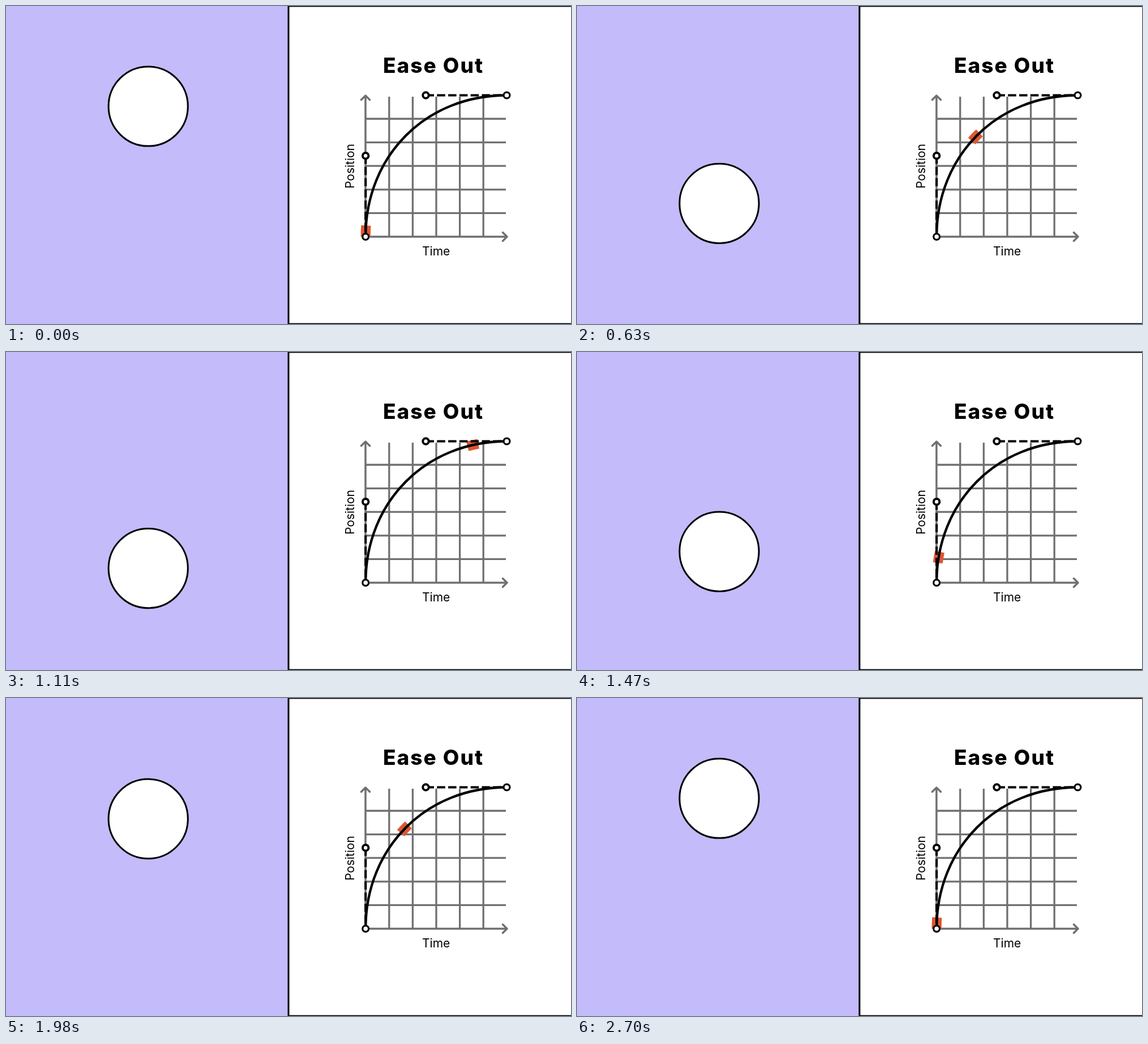
An HTML page that plays this animation: 998x561 px, repeating every 2730 ms.

```html
<!DOCTYPE html>
<html lang="en">
<head>
<meta charset="utf-8">
<title>Ease Out</title>
<style>
  html, body { margin: 0; width: 100%; height: 100%; overflow: hidden; background: #fff; }
  svg { display: block; width: 998px; height: 561px; }
  text { font-family: Inter, sans-serif; text-anchor: middle; fill: #000; }
  .title { font-size: 37px; font-weight: 800; letter-spacing: 2px; }
  .label { font-size: 21px; }
  .grid { fill: none; stroke: #707072; stroke-width: 3.3; }
  .axis { fill: none; stroke: #707072; stroke-width: 3.5; }
  .tip { stroke-linecap: round; stroke-linejoin: round; }
  .handle { fill: none; stroke: #000; stroke-width: 4.2; stroke-dasharray: 14.5 5.3; }
  .curve { fill: none; stroke: #000; stroke-width: 4.3; }
  .dot { fill: #fff; stroke: #000; stroke-width: 3.2; }
  .knob { stroke-width: 4; }
  #marker { fill: none; stroke: #dd5731; stroke-width: 17.2; }
</style>
</head>
<body>
<svg viewBox="0 0 998 561">
  <rect width="499" height="561" fill="#c4bbfa"/>
  <rect x="499" y="0" width="510" height="561" fill="#fff" stroke="#000" stroke-width="3"/>
  <circle id="ball" cx="251.2" cy="177" r="70.1" fill="#fff" stroke="#000" stroke-width="3"/>

  <text class="title" x="755" y="118">Ease Out</text>
  <text class="label" x="759.7" y="440">Time</text>
  <text class="label" transform="translate(615 282.5) rotate(-90)">Position</text>

  <path id="grid" class="grid"/>
  <path class="axis" d="M635 159V407H885"/>
  <path class="axis tip" d="M627.5 165.5L635 158L642.5 165.5M877.5 399.5L885 407L877.5 414.5"/>

  <path id="marker" pathLength="1"/>
  <path class="handle" d="M635.2 264V407M741.5 157.5H884.5"/>
  <path id="curve" class="curve"/>
  <circle class="dot" cx="635.2" cy="407" r="5.4"/>
  <circle class="dot" cx="884.5" cy="157.5" r="5.4"/>
  <circle class="dot knob" cx="635.2" cy="264.2" r="5.2"/>
  <circle class="dot knob" cx="741.5" cy="157.5" r="5.2"/>
</svg>
<script>
  const $ = id => document.getElementById(id);
  const TICK = 30, LOOP = 2730, HALF = 1350;
  const TOP = 177, BOTTOM = 384.5, CELL = 41.6;
  const MARKER = 0.05;

  let lines = "";
  for (let i = 1; i < 6; i++) {
    lines += `M${635.2 + i * CELL} 160V407M635 ${407 - i * CELL}H883`;
  }
  $("grid").setAttribute("d", lines);

  const arc = "M635.2 407C635.2 264 741.5 157.5 884.5 157.5";
  $("curve").setAttribute("d", arc);
  $("marker").setAttribute("d", arc);

  const cubic = (a, b, s) => 3 * (1 - s) ** 2 * s * a + 3 * (1 - s) * s * s * b + s ** 3;

  // Cubic timing curve, solved for x by bisection
  function ease(x) {
    let lo = 0, hi = 1;
    for (let i = 0; i < 30; i++) {
      const mid = (lo + hi) / 2;
      if (cubic(0.2, 0.2, mid) < x) lo = mid; else hi = mid;
    }
    return cubic(0.23, 1, lo);
  }

  function draw(ms) {
    const t = Math.floor((ms % LOOP) / TICK) * TICK;
    const u = (t % HALF) / HALF;
    const down = Math.floor(t / HALF) % 2 === 0;
    const p = u === 0 ? 0 : ease(u);
    const y = down ? TOP + (BOTTOM - TOP) * p : BOTTOM - (BOTTOM - TOP) * p;
    $("ball").setAttribute("cy", y.toFixed(2));
    $("marker").setAttribute("stroke-dasharray", `0 ${u.toFixed(4)} ${MARKER} 2`);
  }

  const start = performance.now();
  function frame() {
    draw(performance.now() - start);
    requestAnimationFrame(frame);
  }
  draw(0);
  requestAnimationFrame(frame);
</script>
</body>
</html>
```
